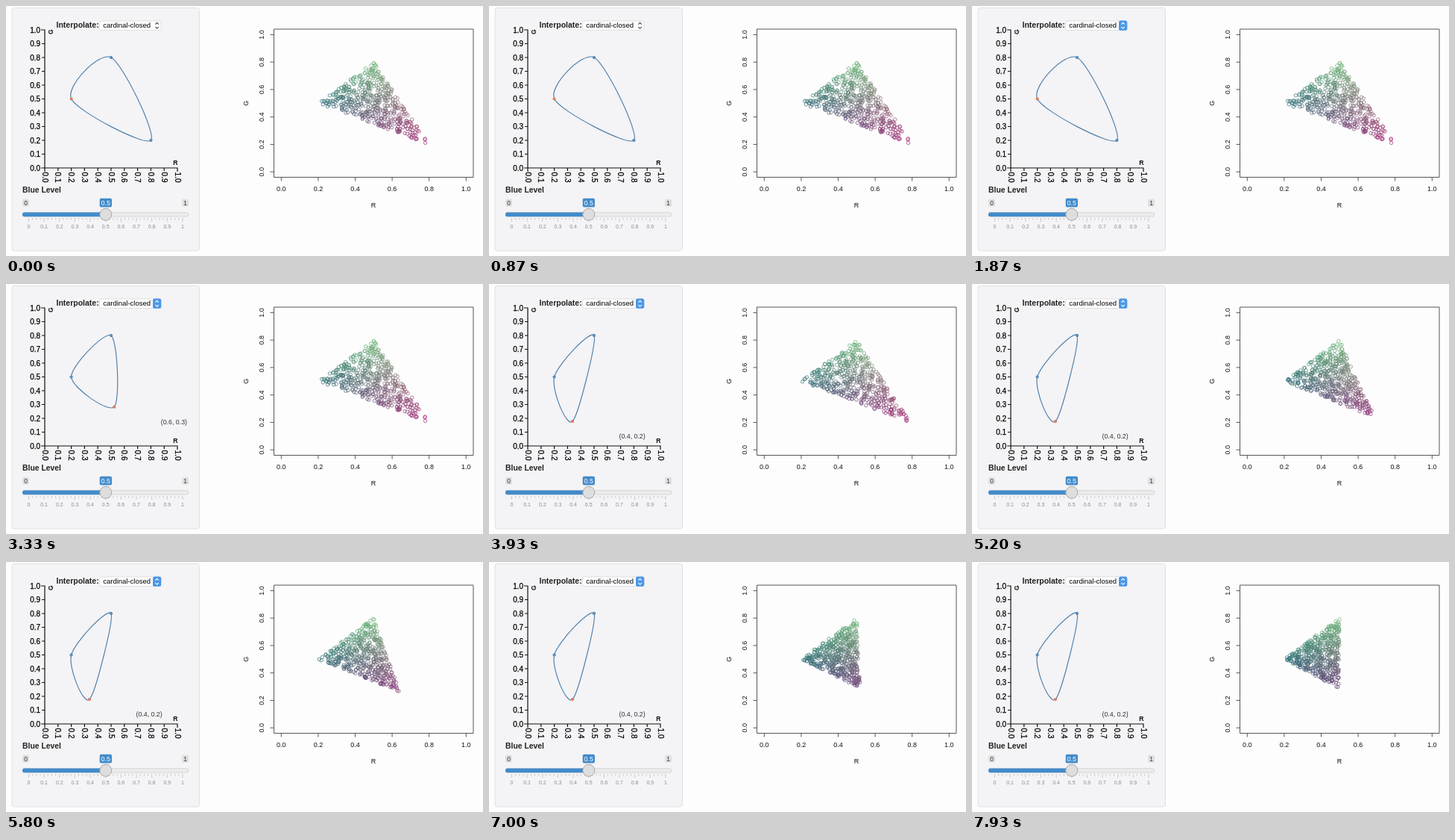
These frames come from a looping animation (640 px wide and 335 px high, 8000 ms). An HTML page with a canvas:

```html
<!DOCTYPE html>
<html lang="en">
<head>
<meta charset="utf-8">
<title>Colour picker curve</title>
<style>
  html, body { margin: 0; width: 100%; height: 100%; overflow: hidden; background: #fefdfe; }
  svg, canvas { position: absolute; left: 0; top: 0; width: 640px; height: 335px; }
  text { font-family: "Liberation Sans", Arial, sans-serif; }
</style>
</head>
<body>
<svg id="stage" viewBox="0 0 640 335"></svg>
<canvas id="dots"></canvas>
<script>
const LOOP = 8000, STEP = 200 / 3, FOCUS_AT = 1270, DOTS = 500;
const NS = "http://www.w3.org/2000/svg";
const svg = document.getElementById("stage");

function add(tag, attrs, text) {
  const el = document.createElementNS(NS, tag);
  for (const k in attrs) el.setAttribute(k, attrs[k]);
  if (text !== undefined) el.textContent = text;
  svg.appendChild(el);
  return el;
}
const label = (x, y, size, text, extra) =>
  add("text", { x, y, "font-size": size, fill: "#111", ...extra }, text);
const turned = (x, y, angle, size, text, extra) =>
  label(0, 0, size, text, { transform: `translate(${x} ${y}) rotate(${angle})`, ...extra });
const path = (d, stroke, width) =>
  add("path", { d, stroke, "stroke-width": width, fill: "none" });
const box = (x, y, width, height, fill, extra) =>
  add("rect", { x, y, width, height, fill, ...extra });

const MID = { "text-anchor": "middle" }, END = { "text-anchor": "end" };
const BOLD = { "font-weight": "bold", fill: "#222" };
const DARK = { fill: "#000", stroke: "#000", "stroke-width": 0.25 };

// Side panel
const px = v => 52 + 178 * v, py = v => 217 - 185 * v;
box(8, 2.5, 251.5, 325.5, "#f4f3f5", { rx: 3, stroke: "#e0e0e2" });

let ticks = "M47 32H52V217H47M52 222V217H230V222";
for (let i = 0; i <= 10; i++) {
  const v = i / 10;
  ticks += `M48 ${py(v)}H52M${px(v)} 217V221`;
  label(46.2, py(v) + 3.6, 10, v.toFixed(1), { ...END, ...DARK });
  turned(px(v) - 3.4, 222.6, 90, 10, v.toFixed(1), DARK);
}
path(ticks, "#111", 1.2);
label(230.5, 213, 8.6, "R", { ...END, "font-weight": "bold" });
turned(62.6, 31.2, -90, 8.6, "G", { ...END, "font-weight": "bold" });

// Drop-down
label(67.5, 29.3, 10.5, "Interpolate:", BOLD);
box(125.5, 20, 82.5, 12.5, "#fff", { rx: 3, stroke: "#d8d8da", "stroke-width": 0.8 });
label(130.2, 29.4, 9.5, "cardinal-closed", { fill: "#000" });
const button = box(197, 19.6, 11.2, 13.2, "#4a97e8", { rx: 2.6 });
const arrows = path("M200.4 24.7L202.6 22.3L204.8 24.7M200.4 27.9L202.6 30.3L204.8 27.9", "#444", 1.1);

// Slider
label(22, 250.2, 10.4, "Blue Level", BOLD);
const badge = (x, y, w, h, fill, ink, size, text) => {
  box(x, y, w, h, fill, { rx: 2 });
  label(x + w / 2, y + h / 2 + size * 0.35, size, text, { ...MID, fill: ink });
};
badge(22, 258.8, 9, 10, "#dfdfdf", "#333", 8.4, "0");
badge(236, 258.8, 9, 10, "#dfdfdf", "#333", 8.4, "1");
badge(125.7, 257.8, 16.3, 11.6, "#428bca", "#fff", 9, "0.5");
box(22.4, 276.8, 222.4, 5.2, "#ececec", { rx: 2.5, stroke: "#cfcfcf", "stroke-width": 0.8 });
box(22, 276.5, 112, 5.8, "#428bca", { rx: 2.5 });
let grid = "";
for (let i = 0; i <= 40; i++) {
  grid += `M${30.5 + i * 5.16} 284v${i % 4 ? 2.6 : 5}`;
  if (i % 4 === 0)
    label(30.5 + i * 5.16, 298, 7, i % 40 ? (i / 40).toFixed(1) : i / 40, { ...MID, fill: "#8c8c8c" });
}
path(grid, "#aaa", 0.6);
add("circle", { cx: 133.8, cy: 279.3, r: 8, fill: "#dedede", stroke: "#a9a9a9" });

// Scatter frame
const sx = v => 369.3 + 248 * v, sy = v => 222.2 - 183.8 * v;
let frame = "M359.5 31H627V229.5H359.5Z";
for (let i = 0; i <= 5; i++) {
  const v = i / 5;
  frame += `M${sx(v)} 229.5v5M359.5 ${sy(v)}h-5`;
  label(sx(v), 248.3, 9, v.toFixed(1), MID);
  turned(346.2, sy(v), -90, 9, v.toFixed(1), MID);
}
path(frame, "#444", 0.9);
label(493, 270.2, 9, "R", MID);
turned(325.2, 130.3, -90, 9, "G", MID);

// Moving parts
const curve = path("", "#4a7fac", 1.15);
const knots = [0, 1, 2].map(() => add("circle", { r: 1.7, "stroke-width": 0.8 }));
const readout = label(0, 0, 8.8, "", { fill: "#333" });

// time, R, G of the dragged corner
const DRAG = [
  [2600, 0.8, 0.2], [2800, 0.76, 0.2], [3070, 0.64, 0.262],
  [3330, 0.525, 0.283], [3670, 0.42, 0.235], [3930, 0.337, 0.178]
];
// the plot lags behind: redraw time, R, G
const REDRAW = [
  [0, 0.8, 0.2], [3530, 0.79, 0.2], [4070, 0.762, 0.2], [4730, 0.72, 0.22],
  [5070, 0.69, 0.236], [5330, 0.66, 0.252], [5600, 0.64, 0.262], [6000, 0.615, 0.267],
  [6400, 0.583, 0.273], [6730, 0.55, 0.28], [6930, 0.52, 0.284], [7330, 0.5, 0.286],
  [7670, 0.495, 0.287]
];
const corners = (r, g) => [[0.2, 0.5], [0.5, 0.8], [r, g]];

function dragged(t) {
  if (t <= DRAG[0][0]) return DRAG[0].slice(1);
  for (let i = 1; i < DRAG.length; i++) {
    const a = DRAG[i - 1], b = DRAG[i];
    if (t < b[0]) {
      const k = (t - a[0]) / (b[0] - a[0]);
      return [a[1] + (b[1] - a[1]) * k, a[2] + (b[2] - a[2]) * k];
    }
  }
  return DRAG[DRAG.length - 1].slice(1);
}

// closed cardinal spline, tension 0.7
function spline(p) {
  const n = p.length;
  const slope = i => [0, 1].map(c => 0.15 * (p[(i + 1) % n][c] - p[(i + n - 1) % n][c]));
  let d = "M" + p[0];
  for (let i = 0; i < n; i++) {
    const j = (i + 1) % n, a = p[i], b = p[j], u = slope(i), v = slope(j);
    d += `C${a[0] + u[0]},${a[1] + u[1]} ${b[0] - v[0]},${b[1] - v[1]} ${b}`;
  }
  return d + "Z";
}

function random(seed) {
  return () => {
    seed = (seed + 0x6D2B79F5) | 0;
    let x = Math.imul(seed ^ (seed >>> 15), 1 | seed);
    x = (x + Math.imul(x ^ (x >>> 7), 61 | x)) ^ x;
    return ((x ^ (x >>> 14)) >>> 0) / 4294967296;
  };
}

const canvas = document.getElementById("dots"), ctx = canvas.getContext("2d");
const ratio = window.devicePixelRatio || 1;
canvas.width = 640 * ratio;
canvas.height = 335 * ratio;
ctx.scale(ratio, ratio);

// jittered low-discrepancy points fill the triangle evenly
function scatter(n) {
  const [a, b, c] = corners(REDRAW[n][1], REDRAW[n][2]);
  const rnd = random(97 + n * 31);
  ctx.clearRect(0, 0, 640, 335);
  ctx.lineWidth = 0.75;
  for (let i = 0; i < DOTS; i++) {
    let u = (i * 0.754878 + rnd() * 0.12) % 1, v = (i * 0.569840 + rnd() * 0.12) % 1;
    if (u + v > 1) { u = 1 - u; v = 1 - v; }
    const [r, g] = [0, 1].map(k => a[k] + u * (b[k] - a[k]) + v * (c[k] - a[k]));
    ctx.strokeStyle = `rgb(${10 + r * 205 | 0},${g * 232 | 0},122)`;
    ctx.beginPath();
    ctx.arc(sx(r), sy(g), 2.2, 0, Math.PI * 2);
    ctx.stroke();
  }
}

let shown = -1;
function draw(now) {
  const t = Math.floor((now % LOOP + 4) / STEP) * STEP;
  const focused = t >= FOCUS_AT - 5, held = t >= DRAG[0][0] - 5;
  button.setAttribute("visibility", focused ? "visible" : "hidden");
  arrows.setAttribute("stroke", focused ? "#fff" : "#444");

  const [r, g] = dragged(t);
  const pts = corners(r, g).map(([x, y]) => [px(x), py(y)]);
  curve.setAttribute("d", spline(pts));
  knots.forEach((k, i) => {
    const on = i === (held ? 2 : 0);
    k.setAttribute("cx", pts[i][0]);
    k.setAttribute("cy", pts[i][1]);
    k.setAttribute("fill", on ? "#ee7a55" : "#5b93c4");
    k.setAttribute("stroke", on ? "#d87c62" : "#4a7fac");
  });
  readout.textContent = held ? `(${(r + 0.06).toFixed(1)}, ${g.toFixed(1)})` : "";
  readout.setAttribute("x", pts[2][0] + 62.5);
  readout.setAttribute("y", pts[2][1] + 23.4);

  let n = 0;
  while (n + 1 < REDRAW.length && t >= REDRAW[n + 1][0] - 5) n++;
  if (n !== shown) scatter(shown = n);
}

const start = performance.now();
function tick() {
  draw(performance.now() - start);
  requestAnimationFrame(tick);
}
tick();
</script>
</body>
</html>
```
